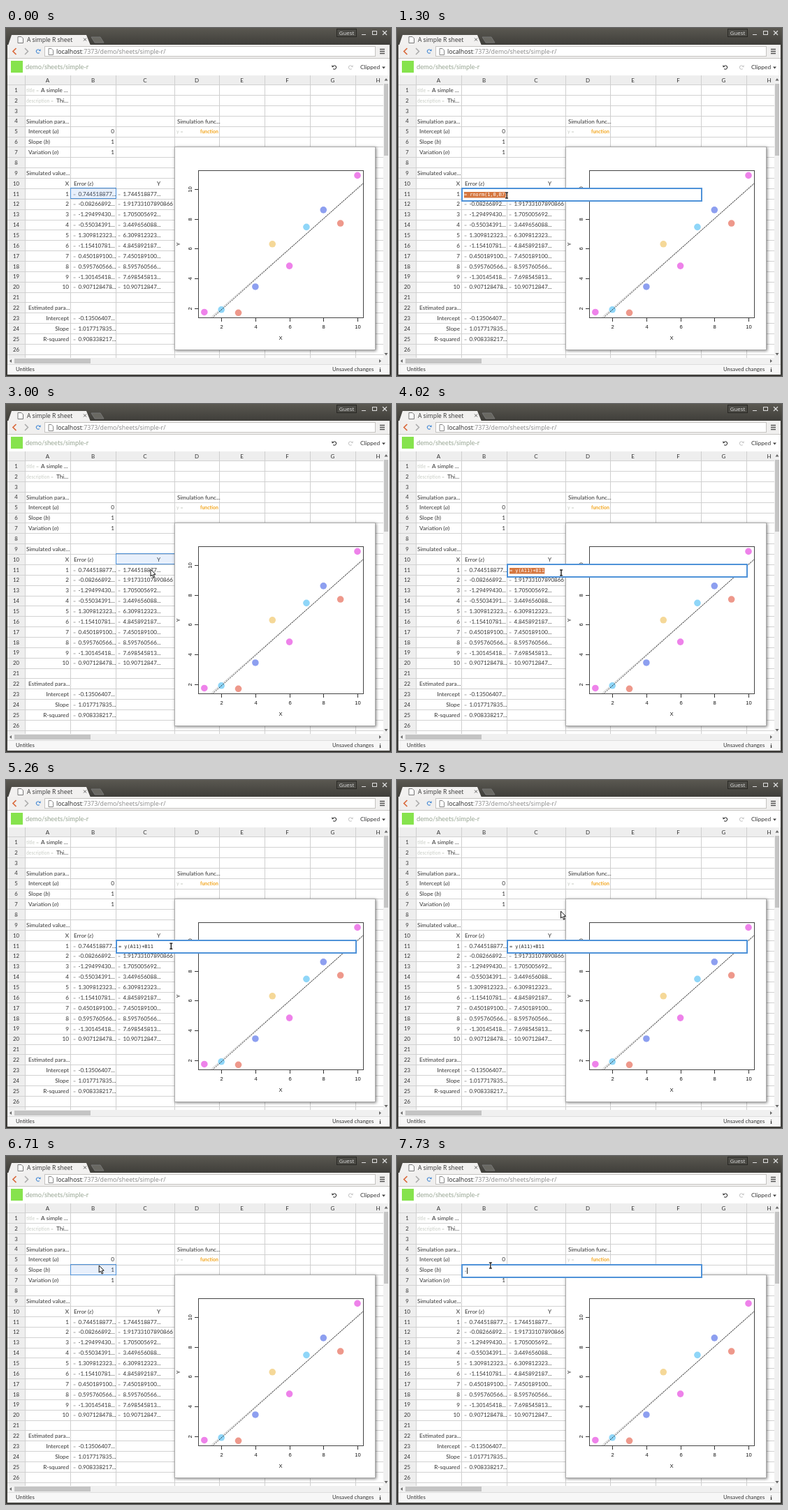
Write an HTML page with a canvas that moves like this. It is 551 px wide and 499 px high and loops after 8 s.

```html
<!DOCTYPE html>
<html lang="en">
<head>
<meta charset="utf-8">
<title>Spreadsheet</title>
<style>
html, body { margin: 0; width: 100%; height: 100%; overflow: hidden; background: #fff }
canvas { display: block }
</style>
</head>
<body>
<canvas id="stage" width="551" height="499"></canvas>
<script>
const g = document.getElementById('stage').getContext('2d');
const LOOP = 8000;
const LATO = 'Lato, sans-serif', UI = '"Open Sans", sans-serif';
const MONO = '"DejaVu Sans Mono", monospace', SERIF = '"Liberation Serif", serif';
const INK = '#333', FAINT = '#c9cdc6', BLUE = '#4f92d8';

const cols = [27, 92, 157, 241, 305, 370, 435, 500, 565];
const rowMid = n => 89 + (n - 1) * 14.87;
const rowTop = n => Math.round(rowMid(n) - 7.8);

const errors = ['0.744518877', '-0.08266892', '-1.29499430', '-0.55034391', '1.309812323',
  '-1.15410781', '0.450189100', '0.595760566', '-1.30145418', '0.907128478'];
const values = ['1.744518877...', '1.91733107890866', '1.705005692...', '3.449656088...', '6.309812323...',
  '4.845892187...', '7.450189100...', '8.595760566...', '7.698545813...', '10.90712847...'];
const dots = ['#ee82ea', '#8fd6f8', '#ee988b', '#8d9ff0', '#f5d898'];
const dotOrder = [0, 1, 2, 3, 4, 0, 1, 3, 2, 0];

function box(x, y, w, h, fill, stroke) {
  if (fill) { g.fillStyle = fill; g.fillRect(x, y, w, h); }
  if (stroke) { g.strokeStyle = stroke; g.lineWidth = 1; g.strokeRect(x + .5, y + .5, w - 1, h - 1); }
}

function text(s, x, y, { size = 8.2, color = INK, family = LATO, align = 'left', style = '' } = {}) {
  g.font = `${style} ${size}px ${family}`;
  g.fillStyle = color;
  g.textAlign = align;
  g.fillText(s, x, y);
  return x + g.measureText(s).width;
}

function path(points, { stroke = INK, width = 1, fill, close, dash = [] } = {}) {
  g.beginPath();
  points.forEach(([x, y]) => g.lineTo(x, y));
  if (close) g.closePath();
  if (fill) { g.fillStyle = fill; g.fill(); }
  if (stroke) {
    g.strokeStyle = stroke; g.lineWidth = width;
    g.setLineDash(dash); g.stroke(); g.setLineDash([]);
  }
}

function disc(x, y, r, fill) {
  g.beginPath(); g.arc(x, y, r, 0, 7); g.fillStyle = fill; g.fill();
}

function turnArrow(x, y, color, flip) {
  g.save();
  g.translate(x, y);
  if (flip) g.scale(-1, 1);
  g.beginPath(); g.arc(0, 0, 2.6, -2.6, 2.3);
  g.strokeStyle = color; g.lineWidth = 1.1; g.stroke();
  path([[-3.6, -3.4], [-3.6, -.2], [-.6, -.6]], { stroke: null, fill: color, close: true });
  g.restore();
}

function drawWindow() {
  box(0, 0, 551, 499, '#3e3d39');
  const bar = g.createLinearGradient(0, 0, 0, 25);
  bar.addColorStop(0, '#5a5851'); bar.addColorStop(1, '#3e3d39');
  box(0, 0, 551, 25, bar);
  path([[3, 25], [8, 10], [115, 10], [121, 25]], { stroke: null, fill: '#f2f1f0', close: true });
  path([[122, 13], [135, 13], [140, 21], [127, 21]], { stroke: '#777', fill: '#696862', close: true });
  path([[17, 12.5], [22, 12.5], [24.5, 15], [24.5, 21.5], [17, 21.5]], { stroke: '#777', fill: '#fff', close: true });
  text('A simple R sheet', 30, 20, { size: 8.5, family: UI });
  path([[111, 14.5], [115, 18.5]], { stroke: '#666' });
  path([[115, 14.5], [111, 18.5]], { stroke: '#666' });
  box(473, 1, 29, 12, '#4c4b46', '#292824');
  text('Guest', 487.5, 10, { size: 7.8, family: UI, color: '#ddd', align: 'center' });
  path([[509, 9.5], [515, 9.5]], { stroke: '#ddd' });
  box(524, 4, 7, 6, null, '#ddd');
  path([[539, 4], [545, 10]], { stroke: '#ddd', width: 1.3 });
  path([[545, 4], [539, 10]], { stroke: '#ddd', width: 1.3 });

  box(2, 24, 547, 20, '#f0efee');
  path([[14.5, 29], [10, 33.5], [14.5, 38]], { stroke: '#d9693c', width: 1.7 });
  path([[27, 29], [31.5, 33.5], [27, 38]], { stroke: '#aaa', width: 1.5 });
  turnArrow(46, 33.5, '#4d8fd6', true);
  box(55, 26, 474, 15, '#fff', '#c5c3c0');
  path([[61, 29.5], [65, 29.5], [67.5, 32], [67.5, 38.5], [61, 38.5]], { stroke: '#888', fill: '#fff', close: true });
  const end = text('localhost', 72, 37, { size: 8.8, family: UI, color: '#222' });
  text(':7373/demo/sheets/simple-r/', end, 37, { size: 8.8, family: UI, color: '#888' });
  for (const y of [30.5, 33.5, 36.5]) path([[535, y], [542, y]], { stroke: '#555', width: 1.5 });

  box(2, 43, 547, 25, '#fff');
  box(2, 43, 547, 1, '#c8c6c3');
  box(7, 47, 17, 17, '#86e34d');
  text('demo/sheets/simple-r', 28, 59, { size: 9.3, color: '#96a491' });
}

function drawTools(saving) {
  if (saving) {
    turnArrow(514, 56.5, '#333');
    turnArrow(536, 56.5, '#ccc', true);
    return;
  }
  turnArrow(470, 56.5, '#444');
  turnArrow(493, 56.5, '#ccc', true);
  text('Clipped', 507, 59.3, { size: 8.4 });
  path([[538, 55.5], [543, 55.5], [540.5, 58.5]], { stroke: null, fill: '#444', close: true });
}

function drawGrid() {
  box(2, 68, 538, 405, '#fff');
  box(2, 68, 538, 14, '#eee');
  box(2, 68, 25, 405, '#eee');
  for (let n = 1; n <= 27; n++) {
    box(2, rowTop(n), 538, 1, '#d2d2d2');
    if (n < 27) text(n, 14.5, rowMid(n) + 2.8, { size: 7.8, align: 'center' });
  }
  cols.slice(0, 8).forEach((x, i) => {
    box(x, 68, 1, 405, '#cfcfcf');
    text('ABCDEFGH'[i], (x + cols[i + 1]) / 2, 78, { size: 8, align: 'center' });
  });
}

const cell = (s, x, n, opts) => text(s, x, rowMid(n) + 2.9, opts);
const right = (s, x, n) => cell(s, x, n, { align: 'right' });

function symbol(label, sign, x, n) {
  x = cell(label + ' (', x, n);
  x = cell(sign, x, n, { family: SERIF, style: 'italic', size: 9 });
  cell(')', x, n);
}

function formula(s, x, n) {
  cell('=', x, n, { color: '#aaa', size: 7 });
  cell(s, x + 7.5, n, { size: 8 });
}

function drawCells() {
  cell('title =', 29, 1, { color: FAINT, size: 7 });
  cell('A simple ...', 50, 1);
  cell('description =', 29, 2, { color: FAINT, size: 6.8 });
  cell('Thi...', 72, 2);
  cell('Simulation para...', 29, 4);
  symbol('Intercept', 'a', 32, 5);
  symbol('Slope', 'b', 32, 6);
  symbol('Variation', 'σ', 32, 7);
  ['0', '1', '1'].forEach((s, i) => right(s, 155, 5 + i));
  cell('Simulation func...', 245, 4);
  cell('y =', 244, 5, { color: FAINT, size: 7 });
  cell('function', 278, 5, { color: '#f2a51d', style: 'bold', size: 6.9 });
  cell('Simulated value...', 29, 9);
  right('X', 90, 10);
  symbol('Error', 'ε', 97, 10);
  right('Y', 221, 10);
  errors.forEach((s, i) => {
    right(i + 1, 90, 11 + i);
    formula(s + '...', 96, 11 + i);
    formula(values[i], 160, 11 + i);
  });
  cell('Estimated para...', 32, 22);
  [['Intercept', '-0.13506407...'], ['Slope', '1.017717835...'], ['R-squared', '0.908338217...']]
    .forEach(([name, value], i) => { right(name, 90, 23 + i); formula(value, 96, 23 + i); });
}

function drawPlot() {
  const px = v => 259.5 + 24.35 * v, py = v => 444.8 - 21.4 * v;
  const label = { size: 7.6, family: '"Liberation Sans", sans-serif', align: 'center', color: '#111' };
  const upright = (s, x, y) => {
    g.save(); g.translate(x, y); g.rotate(-Math.PI / 2); text(s, 0, 0, label); g.restore();
  };
  g.save();
  g.shadowColor = 'rgba(0,0,0,.5)'; g.shadowBlur = 4; g.shadowOffsetX = g.shadowOffsetY = 1;
  box(241, 170, 288, 292, '#fff');
  g.restore();
  box(241, 170, 288, 292, null, '#aaa');
  for (let v = 2; v <= 10; v += 2) {
    const x = Math.round(px(v)) + .5, y = Math.round(py(v)) + .5;
    path([[x, 416], [x, 421]]);
    path([[270, y], [275, y]]);
    text(v, x, 431, label);
    upright(v, 266, y);
  }
  text('X', 393, 447, label);
  upright('Y', 249, 310);
  g.save();
  g.beginPath(); g.rect(275, 204, 237, 212); g.clip();
  const line = (a, b, opts) => path([0, 11].map(v => [px(v), py(a + b * v)]), opts);
  line(0, 1, { stroke: '#c4c4c4' });
  values.forEach((s, i) => disc(px(i + 1), py(parseFloat(s)), 4.8, dots[dotOrder[i]]));
  line(-.135, 1.0177, { stroke: '#222', dash: [2, 1.4] });
  g.restore();
  box(275, 204, 237, 212, null, '#444');
}

function drawFrame() {
  box(540, 68, 9, 405, '#f0f0f0');
  box(541, 80, 6, 103, '#c4c4c4');
  path([[541.5, 75.5], [546.5, 75.5], [544, 72]], { stroke: null, fill: '#666', close: true });
  path([[541.5, 466], [546.5, 466], [544, 469.5]], { stroke: null, fill: '#666', close: true });
  box(2, 473, 547, 9, '#f0f0f0');
  box(12, 474, 109, 7, '#c4c4c4');
  path([[8, 475], [8, 480], [5, 477.5]], { stroke: null, fill: '#666', close: true });
  path([[534, 475], [534, 480], [537, 477.5]], { stroke: null, fill: '#666', close: true });
  box(2, 482, 547, 15, '#f7f7f7');
  box(2, 482, 547, 1, '#ddd');
  text('Untitles', 14, 492, { size: 7.8 });
  text('Unsaved changes', 467, 492, { size: 7.8 });
  text('i', 535.5, 492.5, { size: 9, family: SERIF, style: 'bold', align: 'center' });
}

function select(col, row) {
  const x = cols[col], y = rowTop(row);
  box(x, y - 1, cols[col + 1] - x + 1, 16, 'rgba(90,150,235,.14)', BLUE);
}

function edit(col, row, content, marked, caret) {
  const x = cols[col], y = rowTop(row) - 1, w = 345;
  box(x, y, w, 20, '#fff');
  g.strokeStyle = BLUE; g.lineWidth = 2;
  g.strokeRect(x + 1, y + 1, w - 2, 18);
  const opts = { size: 6.9, family: MONO, color: marked ? '#fff' : '#222' };
  g.font = `${opts.size}px ${MONO}`;
  if (marked) box(x + 4, y + 6, g.measureText(content).width + .5, 8.5, '#d5763f');
  const end = text(content, x + 4, y + 12.4, opts);
  if (caret) box(Math.round(end), y + 5, 1, 9, '#222');
}

// Pointer positions: time, x, y
const track = [[860, 162, 238], [1190, 162, 238], [1300, 157, 240], [1470, 161, 239], [2190, 161, 238],
  [2320, 163, 216], [2690, 163, 216], [3000, 207, 237], [3530, 207, 239], [4020, 235, 242],
  [5220, 235, 242], [5500, 244, 216], [5920, 226, 163], [6250, 226, 163], [6410, 133, 157], [8000, 134, 157]];

function drawPointer(t, beam) {
  const i = track.findIndex(p => p[0] > t);
  if (i < 1) return;
  const [t0, x0, y0] = track[i - 1], [t1, x1, y1] = track[i];
  const k = (t - t0) / (t1 - t0);
  g.save();
  g.translate(x0 + (x1 - x0) * k, y0 + (y1 - y0) * k);
  if (beam) {
    for (const [stroke, width] of [['#fff', 2.6], ['#111', 1.3]]) {
      path([[0, -4], [0, 4]], { stroke, width });
      path([[-2, -4], [2, -4]], { stroke, width });
      path([[-2, 4], [2, 4]], { stroke, width });
    }
  } else {
    path([[0, 0], [0, 10], [2.3, 8], [4, 12], [5.7, 11.2], [4, 7.4], [7, 7.2]],
      { stroke: '#111', width: 1, fill: '#fff', close: true });
  }
  g.restore();
}

function draw(t) {
  const during = (a, b) => t >= a && t < b;
  drawWindow();
  drawTools(during(6090, 6660));
  drawGrid();
  drawCells();
  if (t < 860) select(1, 11);
  if (during(2690, 3330)) select(2, 10);
  if (during(3330, 3530)) select(2, 11);
  if (during(6090, 6660)) select(2, 6);
  if (during(6660, 6950)) select(1, 6);
  drawPlot();
  if (during(860, 2690)) edit(1, 11, '= rnorm(1,0,B7)', during(910, 1630));
  if (during(3530, 6090)) edit(2, 11, '= y(A11)+B11', during(3580, 4520));
  if (t >= 6950) edit(1, 6, t < 7730 ? '1' : '-', t < 7730, t >= 7730);
  drawFrame();
  drawPointer(t, during(860, 2260) || during(3530, 5400) || t >= 6950);
}

function tick(now) {
  draw(now % LOOP);
  requestAnimationFrame(tick);
}
requestAnimationFrame(tick);
</script>
</body>
</html>
```
